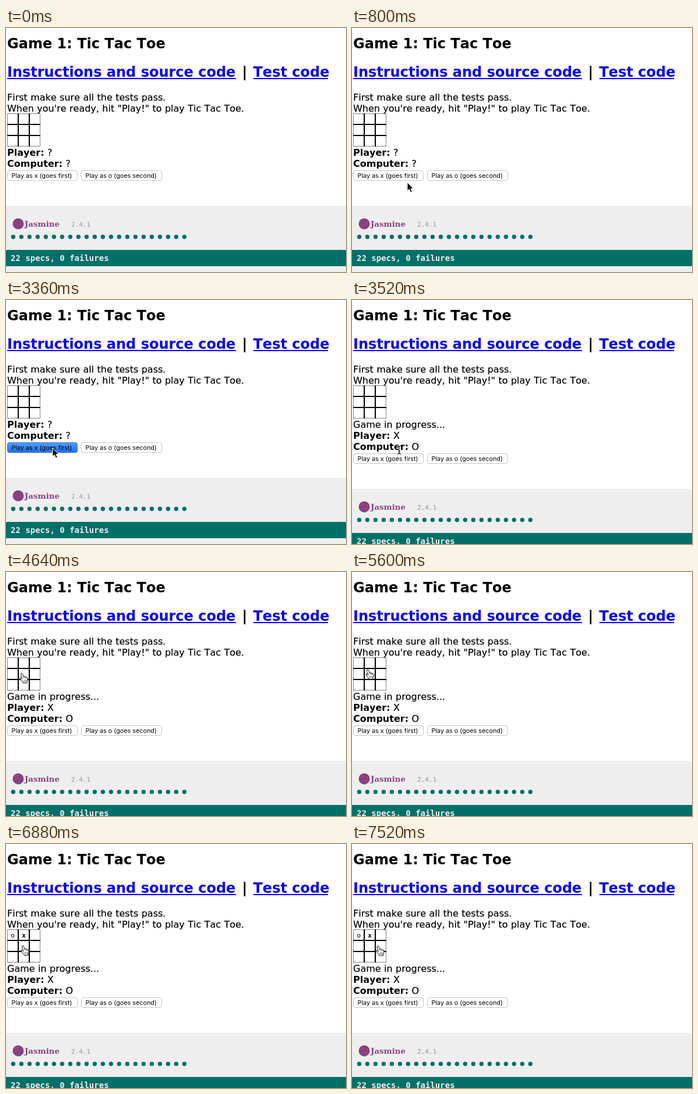
Write an HTML page that moves like this. It is 584 px wide and 420 px high and loops after 8 s.

```html
<!DOCTYPE html>
<html lang="en">
<head>
<meta charset="utf-8">
<title>Tic Tac Toe</title>
<style>
html, body { margin: 0; width: 100%; height: 100%; overflow: hidden; background: #fff; }
svg { display: block; width: 584px; height: 420px; }
text { font: 16px "DejaVu Sans", sans-serif; font-kerning: none; word-spacing: .02em; white-space: pre; }
.body { stroke: #000; stroke-width: .2; }
.heading { font-size: 24px; font-weight: bold; word-spacing: 0; }
.link { fill: #00e; }
.bold { font-weight: bold; stroke: none; }
.label { font: 10.8px Inter, sans-serif; word-spacing: 0; }
.mono { font-family: "DejaVu Sans Mono", monospace; word-spacing: 0; }
.mark { font-size: 11px; text-anchor: middle; }
.brand { font: bold 13.4px "DejaVu Serif", serif; fill: #8a4182; }
.version { font-size: 11px; fill: #999; }
.result { font-size: 14px; font-weight: bold; fill: #eee; }
.button { fill: #fff; stroke: #c4c4c4; }

/* 2% of the loop is one 160 ms step */
.lower, .before, .after, .pressed, .marks, .cursor, .arrow, .beam, .hand {
  animation: 8s step-end infinite;
}
.lower { animation-name: lower; }
.before { animation-name: before; }
.after { animation-name: after; }
.pressed { animation-name: pressed; }
.marks { animation-name: marks; }
.cursor { animation-name: move; }
.arrow { animation-name: arrow; }
.beam { animation-name: beam; }
.hand { animation-name: hand; }
@keyframes lower { 0% { transform: none; } 44%, 100% { transform: translateY(19px); } }
@keyframes before { 0% { opacity: 1; } 44%, 100% { opacity: 0; } }
@keyframes after { 0% { opacity: 0; } 44%, 100% { opacity: 1; } }
@keyframes pressed { 0% { opacity: 0; } 42% { opacity: 1; } 44%, 100% { opacity: 0; } }
@keyframes marks { 0% { opacity: 0; } 78%, 100% { opacity: 1; } }
@keyframes arrow { 0% { opacity: 0; } 6% { opacity: 1; } 44%, 100% { opacity: 0; } }
@keyframes beam { 0% { opacity: 0; } 44% { opacity: 1; } 56%, 100% { opacity: 0; } }
@keyframes hand { 0% { opacity: 0; } 56%, 100% { opacity: 1; } }
@keyframes move {
  0%, 6% { transform: translate(170px, 331px); }
  8% { transform: translate(125px, 301px); }
  10% { transform: translate(95px, 266px); }
  12% { transform: translate(84px, 257px); }
  16% { transform: translate(82px, 256px); }
  18% { transform: translate(80px, 255px); }
  44% { transform: translate(81px, 258px); }
  52% { transform: translate(72px, 243px); }
  54% { transform: translate(50px, 215px); }
  56% { transform: translate(34px, 190px); }
  58% { transform: translate(30.5px, 182.5px); }
  70% { transform: translate(30.5px, 176px); }
  72% { transform: translate(30.5px, 170.5px); }
  84% { transform: translate(31px, 176px); }
  86% { transform: translate(32.5px, 183px); }
  90% { transform: translate(45.5px, 183.5px); }
  92% { transform: translate(47px, 184px); }
  94%, 100% { transform: translate(48px, 183.5px); }
}
</style>
</head>
<body>
<svg viewBox="0 0 584 420">
  <defs>
    <linearGradient id="blue" x2="0" y2="1">
      <stop offset="0" stop-color="#559ffb"/>
      <stop offset="1" stop-color="#1a6df2"/>
    </linearGradient>
  </defs>

  <text class="heading" x="2" y="35">Game 1: Tic Tac Toe</text>
  <text class="heading link" x="2" y="84">Instructions and source code</text>
  <text class="heading" x="405.5" y="84">|</text>
  <text class="heading link" x="424.5" y="84" word-spacing="-1">Test code</text>
  <path class="link" d="M2 86h393v2h-393zM425 86h128v2h-128z"/>
  <text class="body" x="2" y="125">First make sure all the tests pass.</text>
  <text class="body" x="2" y="144">When you're ready, hit "Play!" to play Tic Tac Toe.</text>

  <!-- board -->
  <rect x="2.5" y="147.5" width="56" height="56" fill="none" stroke="#808080"/>
  <path d="M21 147v57M40 147v57M2 166h57M2 185h57" stroke="#000" stroke-width="2"/>
  <g class="marks">
    <text class="mark" x="11.5" y="161">o</text>
    <text class="mono mark bold" x="30.5" y="161">x</text>
  </g>

  <text class="body after" x="2" y="220">Game in progress...</text>

  <g class="lower">
    <text class="body before" x="2" y="220"><tspan class="bold">Player:</tspan> ?</text>
    <text class="body after" x="2" y="220"><tspan class="bold">Player:</tspan> X</text>
    <text class="body before" x="2" y="239"><tspan class="bold">Computer:</tspan> ?</text>
    <text class="body after" x="2" y="239"><tspan class="bold">Computer:</tspan> O</text>

    <rect class="button" x="2.5" y="245.5" width="120" height="17" rx="3.5"/>
    <rect class="button" x="129.5" y="245.5" width="138" height="17" rx="3.5"/>
    <rect class="pressed" x="2.5" y="245.5" width="120" height="17" rx="3.5" fill="url(#blue)" stroke="#2a6fd8"/>
    <text class="label" x="9.5" y="258">Play as x (goes first)</text>
    <text class="label" x="136.5" y="258">Play as o (goes second)</text>

    <!-- test report -->
    <rect y="306" width="584" height="114" fill="#eee"/>
    <circle cx="21" cy="337" r="9.5" fill="#8a4182"/>
    <text class="brand" x="32" y="342">Jasmine</text>
    <text class="mono version" x="112" y="342">2.4.1</text>
    <path d="M12.4 359.5H306.9" stroke="#007069" stroke-width="7.4" stroke-linecap="round" stroke-dasharray="0 14"/>
    <rect y="382" width="584" height="28" fill="#007069"/>
    <text class="mono result" x="8" y="401">22 specs, 0 failures</text>
  </g>

  <g class="cursor">
    <path class="arrow" d="M0 0V14.5L3.3 11.4L5.7 17L8.3 15.9L5.9 10.5H10.5Z" stroke="#fff" stroke-linejoin="round"/>
    <g class="beam" fill="none">
      <path id="caret" d="M-3-7Q0-7 0-5Q0-7 3-7M0-5V5M-3 7Q0 7 0 5Q0 7 3 7M-2 2H2" stroke="#fff" stroke-width="2.4"/>
      <path d="M-3-7Q0-7 0-5Q0-7 3-7M0-5V5M-3 7Q0 7 0 5Q0 7 3 7M-2 2H2" stroke="#000" stroke-width="1.1"/>
    </g>
    <g class="hand" stroke="#000" stroke-linejoin="round" stroke-linecap="round">
      <path d="M-3 1.5L-5-5.5Q-5.3-8.2-3.7-8.3Q-2.4-8.3-1.9-6.5L-.6-2.4Q1-3.9 2-1.9Q3.7-3 4.5-1Q6.6-1.5 6.8.6Q7.2 3.5 5.6 6V8.4H-1.2Q-2 6.2-4 4L-6.6 1.2Q-7.2-.7-5.4-.8Q-4.2-.4-3 1.5Z" fill="#fff"/>
      <path d="M-.6-2.4L0-.2M2-1.9L2.4.2M4.5-1L4.7.6M0 3.4V6M2 3.4V6M4 3.4V6" fill="none" stroke-width=".6"/>
    </g>
  </g>
</svg>
</body>
</html>
```
